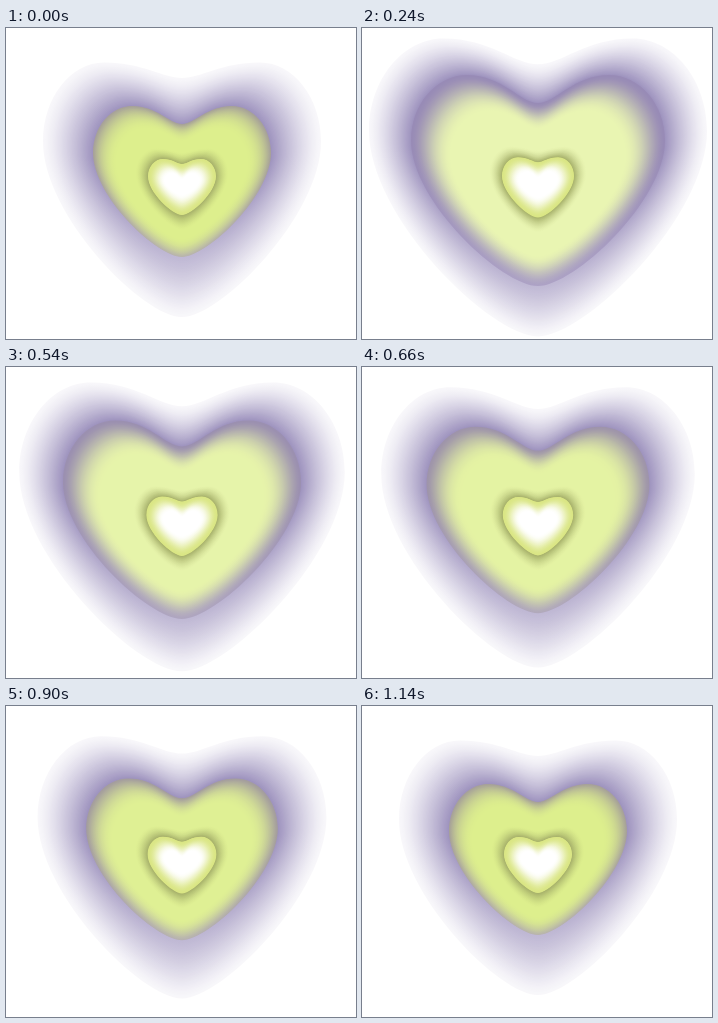
Recreate the animation shown at these times as an HTML page with a canvas. Size 350 by 311 pixels, loop 1200 ms.

```html
<!DOCTYPE html>
<html lang="en">
<head>
<meta charset="utf-8">
<title>Pulsing heart</title>
<style>
html, body { margin: 0; width: 100%; height: 100%; overflow: hidden; background: #fff; }
canvas { display: block; width: 100%; height: 100%; }
</style>
</head>
<body>
<canvas id="stage" width="350" height="311"></canvas>
<script>
const ctx = document.getElementById('stage').getContext('2d');
const LOOP = 1200, STEP = 60, CX = 176;

// A heart is [half width, lobe top, notch, tip]
const SMALL = [89, 78, 96, 229], LARGE = [127, 47, 75, 258], HOLE = [34, 131, 136, 187];

const WHITE = [255, 255, 255], PURPLE = [140, 127, 178], OLIVE = [165, 175, 105];
const GREY = [166, 161, 152], LILAC = [152, 139, 182];
const GREEN = [221, 239, 141], PALE = [233, 245, 178], LIME = [218, 230, 132];

const mix = (a, b, k) => a.map((v, i) => v + (b[i] - v) * k);
const grow = ([w, top, notch, tip], d) => [w + d, top - .87 * d, notch - .92 * d, tip + 1.2 * d];
const rgb = c => `rgb(${c.map(Math.round).join()})`;
const ease = k => (1 - Math.cos(Math.PI * Math.min(1, Math.max(0, k)))) / 2;
const pulse = ms => ms < 260 ? ease(ms / 240) : 1 - ease((ms - 280) / 860);

function trace([w, top, notch, tip]) {
  const lobe = w * .56, mid = top + (tip - top) * .31;
  ctx.beginPath();
  for (const dir of [-1, 1]) {
    const curve = (a, b, c, d, e, f) =>
      ctx.bezierCurveTo(CX + dir * a, b, CX + dir * c, d, CX + dir * e, f);
    ctx.moveTo(CX, notch);
    curve(lobe * .25, notch, lobe * .5, top, lobe, top);
    curve(lobe + (w - lobe) * .55, top, w, mid - (mid - top) * .55, w, mid);
    curve(w, mid + (tip - mid) * .42, w * .28, tip, 0, tip);
    ctx.lineTo(CX, notch);
  }
}

// Fills the band between two hearts with nested hearts, lighter towards the tip
function band(from, to, color, light = () => 0) {
  const count = 40;
  for (let i = 0; i <= count; i++) {
    const u = i / count, shape = mix(from, to, u), c = color(u);
    const fill = ctx.createLinearGradient(0, shape[1], 0, shape[3]);
    fill.addColorStop(.35, rgb(c));
    fill.addColorStop(1, rgb(mix(c, WHITE, light(u))));
    ctx.fillStyle = fill;
    trace(shape);
    ctx.fill();
  }
}

function draw(p) {
  const body = mix(SMALL, LARGE, p), hole = grow(HOLE, 2 * p);
  const edge = mix(GREY, LILAC, p), fill = mix(GREEN, PALE, p);
  const blend = u => ease(u ** (.55 + .3 * p));
  ctx.fillStyle = '#fff';
  ctx.fillRect(0, 0, 350, 311);
  band(grow(body, 50 - 8 * p), body, u => mix(WHITE, PURPLE, .06 + .8 * u ** 1.3), u => .35 * u);
  band(body, mix(body, hole, .45), u => mix(edge, fill, blend(u)), u => .2 * (1 - blend(u)));
  band(grow(hole, 13), hole, u => mix(fill, OLIVE, u ** 1.6));
  band(hole, grow(hole, -17), u => mix(LIME, WHITE, ease(u)));
}

let shown = -1;
function tick() {
  const step = Math.floor(performance.now() % LOOP / STEP);
  if (step !== shown) draw(pulse(step * STEP));
  shown = step;
  requestAnimationFrame(tick);
}
tick();
</script>
</body>
</html>
```
